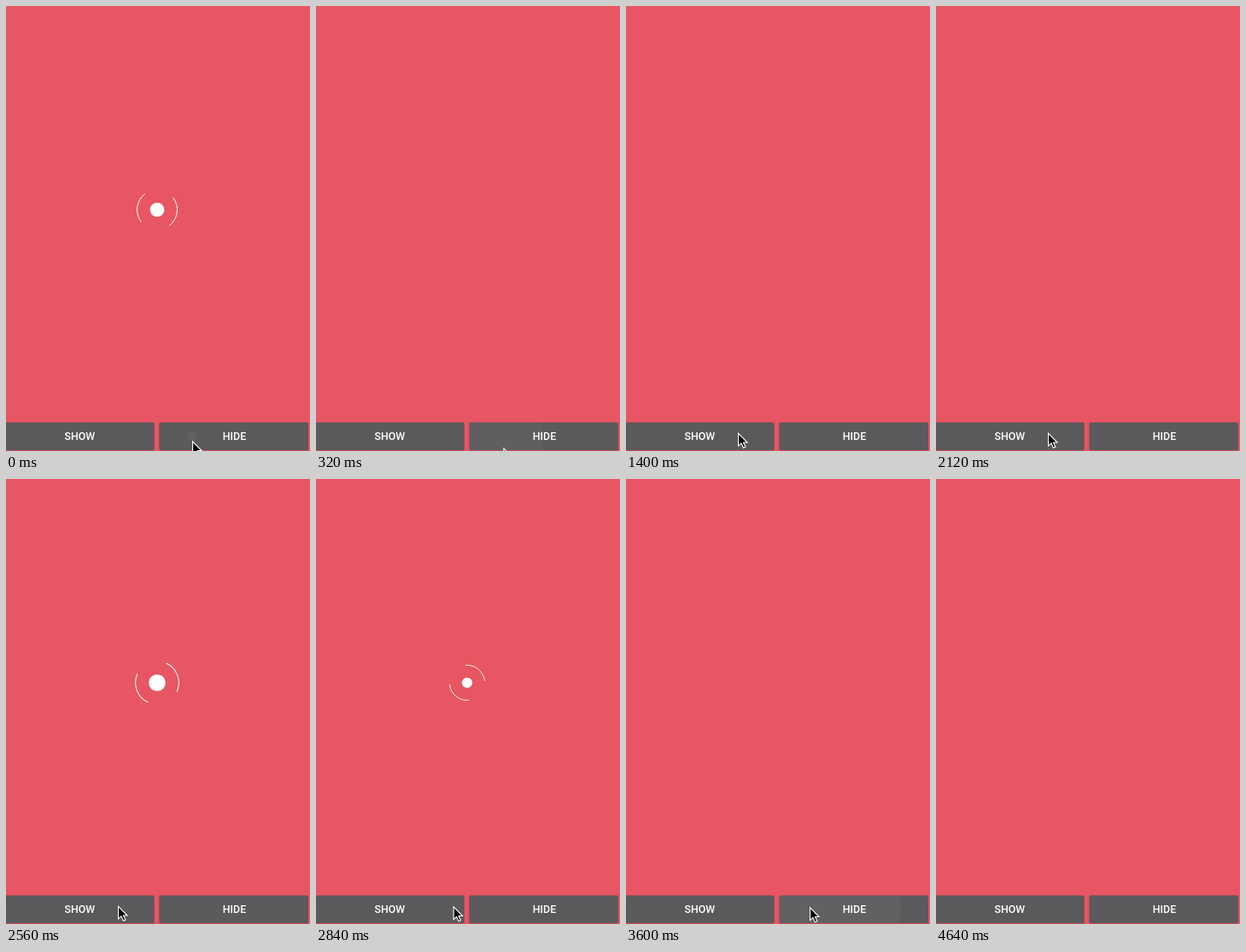
Write an HTML page with a canvas that moves like this. It is 356 by 522 pixels and loops after 5.52 s.

```html
<!DOCTYPE html>
<html lang="en">
<head>
<meta charset="utf-8">
<title>Loading indicator</title>
<style>
  html, body { margin: 0; width: 100%; height: 100%; overflow: hidden; background: #e75662; }
  canvas { display: block; }
</style>
</head>
<body>
<canvas id="stage" width="356" height="522"></canvas>
<script>
const ctx = document.getElementById('stage').getContext('2d');
const LOOP = 5520, STEP = 40, TAU = Math.PI * 2;
const buttons = [
  { label: 'SHOW', x: -4, w: 177.5, mid: 86.3 },
  { label: 'HIDE', x: 179.5, w: 174.5, mid: 267.5 },
];
// Visible spans of the spinner; start is where its one-second cycle begins.
const spins = [
  { from: 0, to: 120, start: -349 },
  { from: 2240, to: 3320, start: 2270 },
];
const ripples = [
  { button: 0, x: 131, from: 1560, grow: 320, radius: 48, fade: 1720, end: 1960 },
  { button: 1, x: 218, from: 0, grow: 400, radius: 54, fade: 240, end: 520 },
  { button: 1, x: 215, from: 3200, grow: 400, radius: 107, fade: 4360, end: 4640 },
];
// Pointer tip as [time, x, y]; each list is one visit to the stage.
const trips = [
  [[0, 218, 510], [200, 219, 517], [520, 220, 520], [680, 220, 523]],
  [[880, 221, 521], [960, 198, 508], [1040, 170, 500.5], [1200, 142, 498.5],
   [1400, 131, 500.5], [2680, 131, 500.5], [3080, 215, 502], [4360, 215, 502],
   [4440, 240, 486], [4520, 303, 428], [4560, 303, 428]],
];
const arrow = new Path2D('M.6.9V15.6L4 12.4 6.4 17.8 8.9 16.7 6.5 11.5H11Z');

const clamp = v => Math.min(1, Math.max(0, v));
const smooth = v => v * v * (3 - 2 * v);
const mix = (a, b, v) => a + (b - a) * v;

function drawSpinner(t) {
  const spin = spins.find(s => t >= s.from && t < s.to);
  if (!spin) return;
  const phase = Math.max(0, t - spin.start) / 1000 % 1;
  const turn = 0.5 - 0.5 * Math.cos(Math.PI * phase);
  const shrink = 1 - Math.abs(1 - 2 * turn);
  const scale = 1 - 0.4 * shrink;
  ctx.save();
  ctx.translate(177, 239);
  ctx.fillStyle = ctx.strokeStyle = '#fff';
  ctx.beginPath();
  ctx.arc(0, 0, 13.5 * (1 - 0.7 * shrink), 0, TAU);
  ctx.fill();
  ctx.rotate(turn * TAU);
  ctx.lineWidth = 1.2 * scale;
  for (const start of [TAU / 8, TAU * 5 / 8]) {
    ctx.beginPath();
    ctx.arc(0, 0, 30 * scale, start, start + TAU / 4);
    ctx.stroke();
  }
  ctx.restore();
}

function drawButton(button, index, t) {
  ctx.save();
  ctx.beginPath();
  ctx.roundRect(button.x, 488.5, button.w, 32.5, 1.5);
  ctx.fillStyle = '#5a595b';
  ctx.shadowColor = 'rgba(0,0,0,.25)';
  ctx.shadowBlur = 1;
  ctx.shadowOffsetY = 0.5;
  ctx.fill();
  ctx.shadowColor = 'transparent';
  ctx.clip();
  for (const r of ripples) {
    if (r.button !== index || t < r.from || t >= r.end) continue;
    const alpha = 0.045 * (1 - clamp((t - r.fade) / (r.end - r.fade)));
    ctx.fillStyle = `rgba(255,255,255,${alpha})`;
    ctx.beginPath();
    ctx.arc(r.x, 505, r.radius * clamp((t - r.from + STEP) / r.grow), 0, TAU);
    ctx.fill();
  }
  ctx.fillStyle = '#fff';
  ctx.font = '500 12.4px Roboto, sans-serif';
  ctx.textAlign = 'center';
  ctx.fillText(button.label, button.mid, 509.3);
  ctx.restore();
}

function drawPointer(t) {
  const trip = trips.find(p => t >= p[0][0] && t < p[p.length - 1][0]);
  if (!trip) return;
  const next = trip.findIndex(p => p[0] > t);
  const [a, b] = [trip[next - 1], trip[next]];
  const raw = (t - a[0]) / (b[0] - a[0]);
  const v = a[0] === 2680 ? smooth(raw) : raw;
  ctx.save();
  ctx.translate(mix(a[1], b[1], v), mix(a[2], b[2], v));
  ctx.fillStyle = '#000';
  ctx.strokeStyle = '#fff';
  ctx.lineWidth = 1.1;
  ctx.fill(arrow);
  ctx.stroke(arrow);
  ctx.restore();
}

function frame() {
  const t = Math.floor(performance.now() % LOOP / STEP) * STEP;
  ctx.fillStyle = '#e75662';
  ctx.fillRect(0, 0, 356, 522);
  drawSpinner(t);
  buttons.forEach((button, index) => drawButton(button, index, t));
  drawPointer(t);
  requestAnimationFrame(frame);
}
frame();
</script>
</body>
</html>
```
